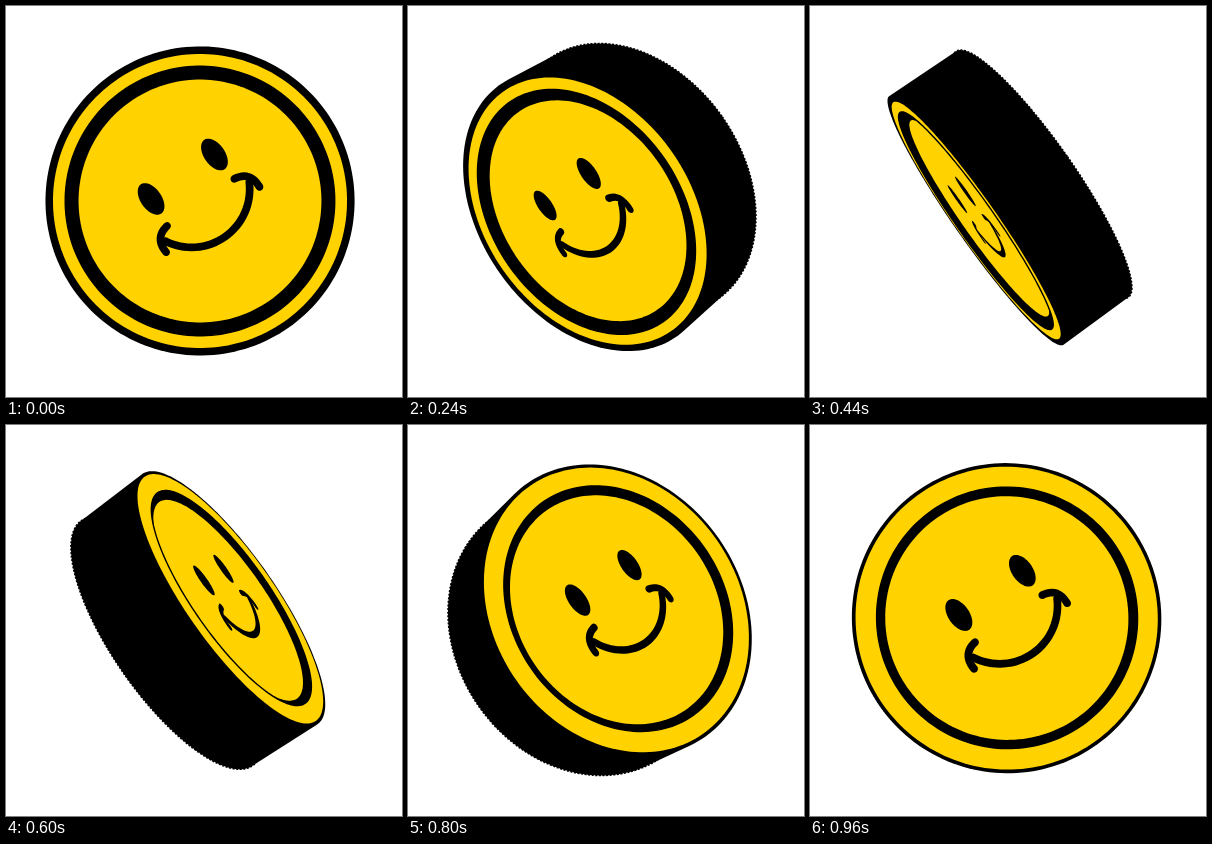
An HTML page that plays this animation: 396 px wide and 391 px high, repeating every 1000 ms.

```html
<!DOCTYPE html>
<html lang="en">
<head>
<meta charset="utf-8">
<title>Spinning smiley coin</title>
<style>
  html, body { margin: 0; width: 100%; height: 100%; overflow: hidden; background: #fff; }
  svg { display: block; width: 100%; height: 100%; }
</style>
</head>
<body>
<svg viewBox="0 0 396 391">
  <defs><clipPath id="well"><path id="wellClip"/></clipPath></defs>
  <path id="teeth" fill="none" stroke="#000" stroke-width="1.6" stroke-dasharray="2 1.6"/>
  <path id="body"/>
  <g id="face">
    <path id="rim" fill="#ffd200"/>
    <path id="hole"/>
    <g clip-path="url(#well)">
      <path id="floor" fill="#ffd200"/>
      <path id="eyeL"/><path id="eyeR"/>
      <path id="smile"/><path id="cheekL"/><path id="cheekR"/>
    </g>
    <path id="lip" fill="none" stroke="#000" stroke-width="1.4"/>
  </g>
</svg>
<script>
const CENTER = { x: 194.3, y: 194.8 };
const TILT = 35 * Math.PI / 180;
const RADIUS = 150, RECESS = 4.5, CAMERA = 1250;
const LOOP = 1000, STEP = 40, TURN = 7.2, START = 1;
// Each side has its own bands and its own distance from the turning axis.
const SIDES = [
  { rim: 142.7, hole: 130.8, z: 37 },
  { rim: 146.5, hole: 126.5, z: 43.5 }
];
const FLOOR = 118.3;

const $ = id => document.getElementById(id);
const TAU = Math.PI * 2;
const range = (n, f) => Array.from({ length: n }, (_, i) => f(i));

const ellipse = (cx, cy, rx, ry, n = 120) => range(n, i => {
  const a = TAU * i / n;
  return [cx + rx * Math.cos(a), cy + ry * Math.sin(a)];
});
const circle = r => ellipse(0, 0, r, r, 180);

// Outline of a round-capped stroke along a list of points.
function thick(pts, width) {
  const r = width / 2, last = pts.length - 1;
  const angle = pts.map((_, i) => {
    const a = pts[Math.max(i - 1, 0)], b = pts[Math.min(i + 1, last)];
    return Math.atan2(b[1] - a[1], b[0] - a[0]);
  });
  const at = (i, turn) => [
    pts[i][0] + r * Math.cos(angle[i] + turn),
    pts[i][1] + r * Math.sin(angle[i] + turn)
  ];
  const q = Math.PI / 2;
  return [
    ...pts.map((_, i) => at(i, -q)),
    ...range(9, k => at(last, -q + Math.PI * k / 8)),
    ...pts.map((_, i) => at(last - i, q)),
    ...range(9, k => at(0, q + Math.PI * k / 8))
  ];
}

function smileLine() {
  const r = 56.7, half = Math.asin(50 / r);
  return range(33, i => {
    const a = half * (i / 16 - 1);
    return [r * Math.sin(a), -14.2 + r * Math.cos(a)];
  });
}

function cheekLine(side) {
  return range(13, i => {
    const t = i / 12, s = 1 - t;
    return [
      side * (s * s * 40 + 2 * s * t * 57 + t * t * 55.5),
      s * s * 1.5 + 2 * s * t * 4 + t * t * 22
    ];
  });
}

const features = {
  floor: circle(FLOOR),
  eyeL: ellipse(-37.7, -29, 10.2, 17.4),
  eyeR: ellipse(37.7, -29, 10.2, 17.4),
  smile: thick(smileLine(), 7.5),
  cheekL: thick(cheekLine(-1), 7.5),
  cheekR: thick(cheekLine(1), 7.5)
};
const edge = circle(RADIUS);

// Turn about the coin's own upright axis, add perspective, then tilt.
function project(pts, z, phi) {
  const c = Math.cos(phi), s = Math.sin(phi);
  const ct = Math.cos(TILT), st = Math.sin(TILT);
  return pts.map(([x, y]) => {
    const k = CAMERA / (CAMERA - (x * s + z * c));
    const u = (x * c - z * s) * k, v = y * k;
    return [CENTER.x + u * ct + v * st, CENTER.y - u * st + v * ct];
  });
}

function hull(points) {
  const sorted = [...points].sort((a, b) => a[0] - b[0] || a[1] - b[1]);
  const chain = list => {
    const out = [];
    for (const p of list) {
      while (out.length > 1) {
        const [a, b] = out.slice(-2);
        const cross = (b[0] - a[0]) * (p[1] - a[1]) - (b[1] - a[1]) * (p[0] - a[0]);
        if (cross > 0) break;
        out.pop();
      }
      out.push(p);
    }
    return out.slice(0, -1);
  };
  return [...chain(sorted), ...chain(sorted.reverse())];
}

function draw(id, pts) {
  $(id).setAttribute('d', 'M' + pts.map(p => p[0].toFixed(2) + ' ' + p[1].toFixed(2)).join('L') + 'Z');
}

function render(ms) {
  const step = Math.floor((ms % LOOP) / STEP);
  const turn = START + TURN * step;
  const side = turn < 90 ? 0 : 1;
  const phi = (turn - 180 * side) * Math.PI / 180;
  const { rim, hole, z } = SIDES[side];

  const back = project(edge, -SIDES[1 - side].z, phi);
  draw('body', hull([...project(edge, z, phi), ...back]));
  draw('teeth', back);

  const visible = CAMERA * Math.cos(phi) > z;
  $('face').style.display = visible ? '' : 'none';
  if (!visible) return;

  const opening = project(circle(hole), z, phi);
  draw('rim', project(circle(rim), z, phi));
  for (const id of ['hole', 'wellClip', 'lip']) draw(id, opening);
  for (const id in features) draw(id, project(features[id], z - RECESS, phi));
}

const begin = performance.now();
function tick() {
  render(performance.now() - begin);
  requestAnimationFrame(tick);
}
render(0);
requestAnimationFrame(tick);
</script>
</body>
</html>
```
